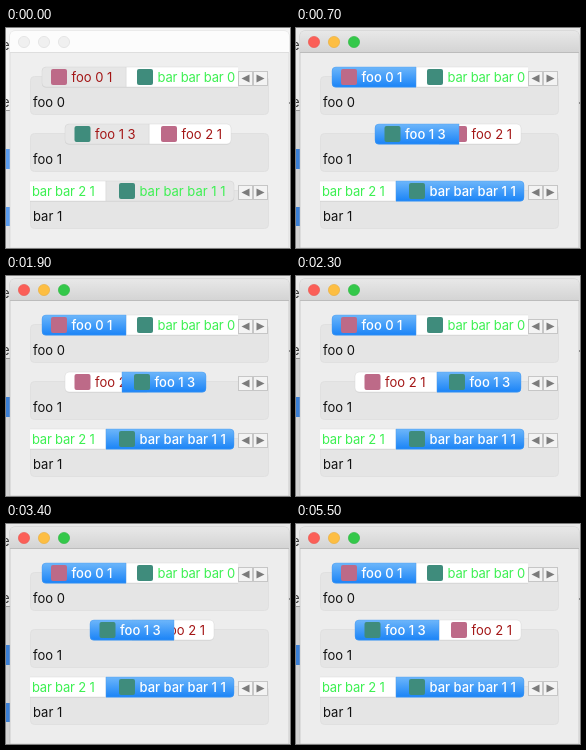
Animation, 284 px wide and 220 px high, one loop 5600 ms. Source, as an HTML page:

```html
<!DOCTYPE html>
<html lang="en">
<head>
<meta charset="utf-8">
<title>Movable tabs</title>
<style>
html, body { margin: 0; width: 284px; height: 220px; overflow: hidden; background: #fff; }
svg { display: block; font: 13px Inter, "Open Sans", sans-serif; }
.on { font-weight: 500; }
.tight { letter-spacing: -.2px; }
</style>
</head>
<body>
<svg id="stage" width="284" height="220" viewBox="0 0 284 220">
  <defs>
    <linearGradient id="blue" x2="0" y2="1"><stop stop-color="#6db6fa"/><stop offset="1" stop-color="#1b84f7"/></linearGradient>
    <linearGradient id="title" x2="0" y2="1"><stop stop-color="#e8e8e8"/><stop offset="1" stop-color="#d3d3d3"/></linearGradient>
    <clipPath id="view"><rect x="24" y="30" width="208" height="160"/></clipPath>
  </defs>
  <g id="scene"></g>
</svg>
<script>
const LOOP = 5600, STEP = 100;
const FIRST = 59, LAST = 143, SWAP = 1100, BACK = 3230, SLIDE = 250;
const RED = '#a31515', GREEN = '#3df052';
const MAUVE = '#bd6a88', TEAL = '#3f8c7c';
// time and left edge of the dragged tab
const drag = [[0, 59], [200, 59], [700, 79], [SWAP, 101], [1900, 116],
  [2300, 141], [3100, 141], [BACK, 99], [3400, 84], [3800, 59], [LOOP, 59]];
const scene = document.getElementById('scene');

const rect = (x, y, w, h, fill, more = '') =>
  `<rect x="${x}" y="${y}" width="${w}" height="${h}" fill="${fill}" ${more}/>`;
const text = (x, y, s, fill = '#111', more = '') =>
  `<text x="${x}" y="${y}" fill="${fill}" ${more}>${s}</text>`;

function along(keys, t) {
  const i = Math.max(1, keys.findIndex(k => k[0] >= t));
  const [t0, a] = keys[i - 1], [t1, b] = keys[i];
  return Math.round(a + (b - a) * (t - t0) / (t1 - t0));
}

function ease(p) {
  p = Math.min(1, Math.max(0, p));
  return p < .5 ? 2 * p * p : 1 - 2 * (1 - p) ** 2;
}

// rl and rr are the left and right corner radii
function tabShape(x, y, w, rl, rr, fill, edge) {
  const h = 20;
  const d = `M${x + rl} ${y}h${w - rl - rr}q${rr} 0 ${rr} ${rr}v${h - 2 * rr}q0 ${rr} ${-rr} ${rr}` +
    `h${rl + rr - w}q${-rl} 0 ${-rl} ${-rl}v${2 * rl - h}q0 ${-rl} ${rl} ${-rl}z`;
  return `<path d="${d}" transform="translate(0 .5)" fill="${edge}"/>` +
    `<path d="${d}" fill="${fill}" stroke="${edge}" stroke-width=".4"/>`;
}

function tab(o, y, active) {
  const { x, w, label, color, icon, pad = 10, rl = 0, rr = 0, on } = o;
  const lit = on && active;
  const fill = lit ? 'url(#blue)' : on ? '#e6e6e6' : '#fff';
  const edge = lit ? '#4a9bf0' : '#cfcfcf';
  const ink = lit ? '#fff' : color;
  const style = lit ? 'class="on"' : color === GREEN && !on ? 'class="tight"' : '';
  return tabShape(x, y, w, rl, rr, fill, edge) +
    (icon ? rect(x + pad - .5, y + 2, 16, 16, icon, 'rx="2"') + text(x + pad + 20, y + 15, label, ink, style)
          : text(x + w - 11.5, y + 15, label, ink, 'text-anchor="end" ' + style));
}

function arrows(y) {
  const box = (x, d) => rect(x + .5, y + 4.5, 14, 14, '#f3f3f3', 'stroke="#c6c6c6"') +
    `<path d="M${x + 7.5 - 4 * d} ${y + 7.5}v8l${8 * d} -4z" fill="#7b7b7b"/>`;
  return box(232, -1) + box(247, 1);
}

function row(y, label, tabs, active, scroll) {
  return rect(24.5, y + 9.5, 238, 38, '#e5e5e5', 'rx="4" stroke="#e0e0e0"') +
    text(27, y + 40, label) +
    `<g clip-path="url(#view)">${tabs.map(o => tab(o, y, active)).join('')}</g>` +
    (scroll ? arrows(y) : '');
}

function backdrop(active, lower) {
  const blue = active ? '#3c80d6' : '#5b9df0';
  return rect(0, 0, 284, 220, active ? '#e9e9e9' : '#f4f4f4') +
    text(-4, 22, 'e', '#333') + text(-4, 79, 'e', '#333') +
    rect(0, 82, 4, 1, '#999') +
    rect(0, 83, 4, 137, active ? '#d2d2d2' : '#e2e2e2') +
    rect(0, 121, 4, 20, blue) +
    (lower ? rect(0, 179, 4, 19, blue) : '') +
    rect(283, 74, 1, 2, '#777');
}

function frame(active) {
  const fills = active ? ['#fb5f58', '#fdbe43', '#34c84a'] : Array(3).fill('#f0f0f0');
  const rims = active ? ['#e8544d', '#e8ac38', '#2ab53e'] : Array(3).fill('#dadada');
  return `<path d="M4 220V8q0-5 5-5h269q5 0 5 5v212z" fill="${active ? '#ededed' : '#efefef'}" stroke="${active ? '#b5b5b5' : '#d0d0d0'}" stroke-width=".6"/>` +
    `<path d="M4 25V8q0-5 5-5h269q5 0 5 5v17z" fill="${active ? 'url(#title)' : '#fcfcfc'}"/>` +
    rect(4, 24, 279, 1, active ? '#bcbcbc' : '#dedede') +
    fills.map((c, i) => `<circle cx="${18 + 20 * i}" cy="14" r="5.6" fill="${c}" stroke="${rims[i]}" stroke-width=".6"/>`).join('');
}

function middleTabs(t) {
  const swapped = t >= SWAP && t < BACK;
  const gone = t < BACK ? ease((t - SWAP) / SLIDE) : 1 - ease((t - BACK) / SLIDE);
  const ends = first => first ? { pad: 10, rl: 4 } : { pad: 12.5, rr: 4 };
  return {
    swapped,
    tabs: [
      { x: Math.round(LAST + (FIRST - LAST) * gone), w: 82, label: 'foo 2 1', color: RED, icon: MAUVE, ...ends(swapped) },
      { x: along(drag, t), w: 84, label: 'foo 1 3', color: RED, icon: TEAL, on: true, ...ends(!swapped) }
    ]
  };
}

const top2 = [
  { x: 120, w: 120, label: 'bar bar bar 0', color: GREEN, icon: TEAL, pad: 11.5 },
  { x: 36, w: 84, label: 'foo 0 1', color: RED, icon: MAUVE, pad: 9.5, rl: 4, on: true }
];
const bottom = [
  { x: 10, w: 90, label: 'bar bar 2 1', color: GREEN },
  { x: 100, w: 128, label: 'bar bar bar 1 1', color: GREEN, icon: TEAL, pad: 13.5, rr: 4, on: true }
];

function draw(t) {
  const active = t >= 100, mid = middleTabs(t);
  const lower = t < 1600 || (t >= 2800 && t < 4800);
  scene.innerHTML = backdrop(active, lower) + frame(active) +
    row(39, 'foo 0', top2, active, true) +
    row(96, 'foo 1', mid.tabs, active, mid.swapped) +
    row(153, 'bar 1', bottom, active, true);
}

let last = -1;
const start = performance.now();
function tick() {
  const t = Math.floor((performance.now() - start) % LOOP / STEP) * STEP;
  if (t !== last) draw(last = t);
  requestAnimationFrame(tick);
}
tick();
</script>
</body>
</html>
```
